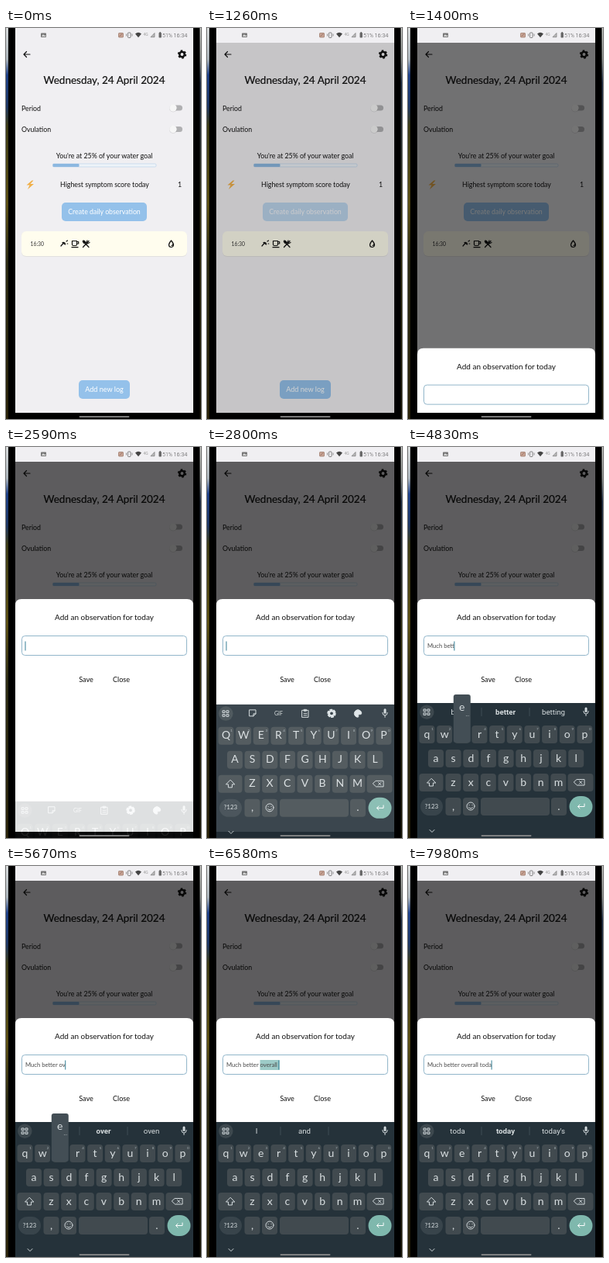
Recreate the animation shown at these times as an HTML page. Size 252 by 504 pixels, loop 8 s.

```html
<!DOCTYPE html>
<html lang="en">
<head>
<meta charset="utf-8">
<title>Daily observation</title>
<style>
html, body { margin: 0; width: 100%; height: 100%; overflow: hidden; background: #000; }
svg { display: block; width: 100%; height: 100%; }
text { font-family: Lato, "Open Sans", sans-serif; font-size: 8.8px; fill: #111; white-space: pre; }
.mid { text-anchor: middle; }
#hints text, .status text { font-family: Roboto, "Noto Sans", sans-serif; }
.kb text { fill: #d8dee0; text-anchor: middle; }
.line { fill: none; stroke: #111; stroke-width: 1.2; stroke-linecap: round; stroke-linejoin: round; }
.kb .line { stroke: #d2d9dc; stroke-width: 1; }
</style>
</head>
<body>
<svg viewBox="0 0 252 504">
  <defs>
    <linearGradient id="wallL" x2="0" y2="1">
      <stop offset="0" stop-color="#d5d8d8"/><stop offset=".08" stop-color="#a9b2b8"/>
      <stop offset=".12" stop-color="#1d3f86"/><stop offset=".2" stop-color="#1c3561"/>
      <stop offset=".25" stop-color="#3b3a14"/><stop offset=".45" stop-color="#5a4e12"/>
      <stop offset=".6" stop-color="#2b2a12"/><stop offset="1" stop-color="#2a230a"/>
    </linearGradient>
    <linearGradient id="wallR" x2="0" y2="1">
      <stop offset="0" stop-color="#c9cbc6"/><stop offset=".08" stop-color="#8e928e"/>
      <stop offset=".14" stop-color="#23324a"/><stop offset=".5" stop-color="#38340f"/>
      <stop offset="1" stop-color="#1c190a"/>
    </linearGradient>
    <clipPath id="screen"><rect x="12" width="230" height="504"/></clipPath>
    <g id="gear">
      <circle r="3.2" fill="none" stroke="currentColor" stroke-width="2.5"/>
      <circle r="4.8" fill="none" stroke="currentColor" stroke-width="1.8" stroke-dasharray="2.5 2.527"/>
    </g>
    <g id="toggle">
      <rect x="212" y="-3.5" width="16" height="7" rx="3.5" fill="#b0b0b2"/>
      <circle cx="216" cy=".5" r="5" fill="#000" opacity=".1"/>
      <circle cx="216" r="4.7" fill="#f6f6f6"/>
    </g>
  </defs>
  <rect width="3" height="504" fill="url(#wallL)"/>
  <rect x="250.500" width="1.500" height="504" fill="url(#wallR)"/>

  <g clip-path="url(#screen)">
    <rect x="12" width="230" height="504" fill="#f0eff2"/>
    <path class="line" d="M31 34H23M26.5 30.500L23 34l3.500 3.500"/>
    <use href="#gear" x="227.500" y="34" color="#111"/>
    <text class="mid" x="127" y="71.500" style="font-size:13.500px;stroke:#111;stroke-width:.2">Wednesday, 24 April 2024</text>
    <text x="20" y="106.500">Period</text>
    <text x="20" y="134">Ovulation</text>
    <use href="#toggle" y="103"/>
    <use href="#toggle" y="130.500"/>
    <text class="mid" x="127" y="168">You're at 25% of your water goal</text>
    <rect x="60.500" y="175" width="133.500" height="4" rx="1.500" fill="#eef3f8" stroke="#b4cfe9" stroke-width=".6"/>
    <rect x="60.500" y="175" width="34" height="4" rx="1" fill="#8cb8e0"/>
    <path d="M33.500 196.500l-7 6h4l-2.500 5.500 8-7h-4.500l4-4.500z" fill="#f0b04a"/>
    <text class="mid" x="127.500" y="205">Highest symptom score today</text>
    <text class="mid" x="224.500" y="205">1</text>
    <g id="create">
      <rect x="72" y="225" width="110" height="24" rx="5" fill="#94c1ea"/>
      <text class="mid" x="127" y="240.300" style="fill:#fff">Create daily observation</text>
    </g>
    <rect x="20" y="262.500" width="214" height="32.500" rx="6" fill="#e2e1df"/>
    <rect x="20" y="262" width="214" height="32" rx="6" fill="#fffdee"/>
    <text x="31.500" y="281.300" style="font-size:6.800px;fill:#333">16:30</text>
    <path class="line" d="M71 281l3-3.500M73 276.500l3.500 2.500q0-3.500-3.500-2.500zM78 275l1.500-1M79 278h.8" stroke-width="1"/>
    <path class="line" d="M85.500 274.500h6v4.500q0 1.500-1.500 1.500h-3q-1.500 0-1.500-1.500zM91.500 275.500h2.200v2.500h-2.200M85 282.700h8"/>
    <path class="line" d="M99.500 274.500l7.500 8M107 274.500l-7.500 8M105 274l-1.500 3M108 276.500l-3 1.500" stroke-width="1.500"/>
    <ellipse cx="101" cy="275.800" rx="1.800" ry="2.600" fill="#111" transform="rotate(-42 101 275.800)"/>
    <path class="line" d="M213.500 274q-3 3.500-3 5.500a3 3 0 0 0 6 0q0-2-3-5.500zM214 280.500q1.200 0 1.300-1.300"/>
    <rect x="94" y="454" width="66" height="24" rx="5" fill="#94c1ea"/>
    <text class="mid" x="127" y="469.300" style="font-size:9.100px;fill:#fff">Add new log</text>

    <rect id="dim" x="12" y="19" width="230" height="485"/>
    <g class="status">
      <rect x="12" width="230" height="19" fill="#f0eff2"/>
      <rect x="45" y="6.500" width="7" height="5.500" rx=".8" fill="#777"/><path d="M46 11l2-3 1.500 2 1-1 1 2z" fill="#ddd"/>
      <rect x="145.500" y="6.500" width="6" height="5.500" rx=".8" fill="#c9a596" stroke="#96705f" stroke-width=".7"/><path d="M147 10.500l3-3" stroke="#7d5547" stroke-width=".8"/>
      <rect x="157.500" y="6" width="3.500" height="6.500" rx=".8" fill="none" stroke="#666" stroke-width=".8"/><path d="M155.500 7.500v3M163 7.500v3" stroke="#666" stroke-width=".7"/>
      <path d="M167 7.500q4-3.500 8 0l-4 4.800z" fill="#444"/>
      <text x="177.500" y="10" style="font-size:5px;fill:#999">4G</text>
      <path d="M187 11.700h5V6.500z" fill="#bbb" stroke="#777" stroke-width=".7"/>
      <rect x="197.500" y="6" width="3.400" height="6.500" rx=".8" fill="#666"/><rect x="198.500" y="5" width="1.400" height="1.500" fill="#666"/>
      <text x="202" y="11.500" style="font-size:7px;font-weight:300;fill:#555">51%</text>
      <text x="216.500" y="11.500" style="font-size:7.300px;font-weight:300;fill:#444">16:34</text>
    </g>

    <g id="sheet">
      <path d="M12 330V8q0-8 8-8H234q8 0 8 8V330z" fill="#fff"/>
      <text class="mid" x="127" y="27.300" style="font-size:10px">Add an observation for today</text>
      <rect x="20.500" y="47.500" width="213" height="25" rx="4" fill="#fff" stroke="#86aec4" stroke-width=".9"/>
      <rect id="mark" y="54" height="13" fill="#9dcbc7"/>
      <text id="entry" x="25" y="63" style="font-size:7.700px;fill:#4a4a4a"></text>
      <rect id="caret" y="54.500" width="1" height="12" fill="#347f96"/>
      <text class="mid" x="103.500" y="107.300" style="font-size:9.100px">Save</text>
      <text class="mid" x="149" y="107.300" style="font-size:9.100px">Close</text>
    </g>

    <rect x="12" y="496" width="230" height="8" fill="#000"/>
    <g id="kb" class="kb">
      <rect x="12" y="330" width="230" height="174" fill="#25323a"/>
      <g class="line">
        <circle cx="24.300" cy="341.700" r="9.300" fill="#3d484e" stroke="none"/>
        <path d="M20.500 338h2.600v2.600h-2.600zM25.400 338h2.600v2.600h-2.600zM20.500 342.800h2.600v2.600h-2.600zM25.400 342.800h2.600v2.600h-2.600z"/>
        <path d="M230 337v3.500" stroke-width="3"/><path d="M226.800 340.500a3.200 3.600 0 0 0 6.400 0M230 344.500v2"/>
      </g>
      <g id="tools" class="line">
        <path d="M55 337h8v5l-3 3h-5zM60 345v-3h3"/>
        <text x="92.500" y="344" style="font-size:7px;stroke:none">GIF</text>
        <path d="M123 337.500h8v9h-8zM125.500 336.500h3v2h-3zM125 341.500h4M125 344h4"/>
        <use href="#gear" x="161" y="341.500" color="#dde4e7"/>
        <path d="M195 337a4.700 4.700 0 1 0 0 9.400q1.500-.4 .7-2t1.300-1.600h1.500q1.500-.3 1.200-1.800a4.700 4 0 0 0-4.700-4z" fill="#dde4e7"/>
      </g>
      <g id="hints"><path d="M95 336v11M157 336v11" stroke="#46545c" stroke-width=".8"/></g>
      <g id="keys"></g>
      <g class="line">
        <path d="M30 427.500l-5.500 5.500h3v4h5v-4h3zM218.500 428.500h9.500v7.500h-9.500l-4-3.750zM221.500 430.500l3.500 3.500M225 430.500l-3.500 3.500"/>
        <circle cx="81" cy="463" r="5"/><path d="M79 461.500h.2M83 461.500h.2M78.500 464.500q2.500 3 5 0"/>
        <path d="M228 460v3.500h-8.500M222 461l-2.500 2.500 2.500 2.500" stroke="#fff"/>
        <path d="M28 493.500l3 3 3-3"/>
      </g>
      <g id="popup">
        <rect x="-11" y="-40" width="22" height="62" rx="3" fill="#434e55"/>
        <text y="-19" style="font-size:14px"></text>
        <text x="7" y="-12" style="font-size:6px">…</text>
      </g>
    </g>
    <rect x="94.500" y="500.300" width="65" height="1.600" rx=".8" fill="#8c8c8c"/>
  </g>
</svg>
<script>
const LOOP = 8000, FOCUS = 2550, MARK = [6510, 6830];
// Commit time, character, word suggestions afterwards
const TYPING = [
  [3360, 'M', 'M,My,Me'], [3570, 'u', 'Mu,My,Much'], [3780, 'c', 'Muc,Much,Music'], [3930, 'h', 'Much,Much,Muchas'],
  [4100, ' ', 'better,more,love'], [4280, 'b', 'b,better,be'], [4440, 'e', 'be,better,been'], [4600, 't', 'bet,better,between'],
  [4730, 't', 'bett,better,betting'], [4900, 'e', 'bette,better,Bette'], [5050, 'r', 'better,better,betters'],
  [5200, ' ', 'than,now,and'], [5400, 'o', 'o,on,of'], [5550, 'v', 'ov,over,oven'], [5690, 'e', 'ove,over,overall'],
  [5830, 'r', 'over,over,overall'], [5980, 'a', 'overa,overall,over'], [6120, 'l', 'overal,overall,overalls'],
  [6270, 'l', 'overall,overall,overalls'], [6510, ' ', 'I,and,'], [6880, 't', 't,the,today'],
  [7210, 'o', 'to,to,today'], [7530, 'd', 'tod,today,Todd'], [7850, 'a', "toda,today,today's"]
];
const PREVIEW = { before: 75, after: 40 };
const KEY = '#414a4f', KEY_DOWN = '#566067';
const $ = id => document.getElementById(id);
const clamp = v => Math.max(0, Math.min(1, v));
const easeOut = p => 1 - (1 - p) ** 2;

function add(parent, tag, attrs, text = '') {
  const node = document.createElementNS('http://www.w3.org/2000/svg', tag);
  for (const name in attrs) node.setAttribute(name, attrs[name]);
  node.textContent = text;
  return parent.appendChild(node);
}

const keyPos = {}, letters = [];
function addKey(x, y, width, label, { size = 14, fill = KEY, radius = 4, height = 23 } = {}) {
  const rect = add($('keys'), 'rect', { x: x - width / 2, y, width, height, rx: radius, fill });
  const text = add($('keys'), 'text', { x, y: y + 11 + size * .33, style: `font-size:${size}px` }, label);
  return { rect, text };
}
['qwertyuiop', 'asdfghjkl', 'zxcvbnm'].forEach((row, r) => {
  [...row].forEach((letter, i) => {
    const x = [24.5, 36, 58.5][r] + i * 22.65, y = 359 + r * 31;
    keyPos[letter] = [x, y];
    letters.push([letter, addKey(x, y, 20, letter).text]);
    if (r === 0) add($('keys'), 'text', { x: x + 7, y: y + 6, style: 'font-size:4.5px;fill:#a9b4b9' }, (i + 1) % 10);
  });
});
addKey(30, 421, 31, '');
addKey(223, 421, 33, '');
addKey(30.5, 452, 29, '?123', { size: 8, fill: '#38444b', radius: 11.5 });
addKey(58.5, 452, 20, ',');
addKey(81, 452, 20, '');
const spaceBar = addKey(138.5, 452, 89, '').rect;
addKey(195, 452, 20, '.');
addKey(223.5, 450, 30, '', { fill: '#7fb8ad', radius: 13.5, height: 27 });

const hints = [64, 126, 188].map(x =>
  add($('hints'), 'text', { x, y: 344.7, 'font-weight': 400, style: 'font-size:9.7px' }));
const [popupLetter] = $('popup').querySelectorAll('text');

const show = (node, on) => node.setAttribute('visibility', on ? 'visible' : 'hidden');
const setText = (node, value) => { if (node.textContent !== value) node.textContent = value; };

function drawSheet(t, typed) {
  const top = t >= FOCUS ? 196 : 504 - 142 * easeOut(clamp((t - 1260) / 350));
  $('sheet').setAttribute('transform', `translate(0 ${top})`);
  $('dim').setAttribute('opacity', .61 * clamp((t - 1190) / 245));
  $('create').setAttribute('opacity', t < 1120 || t > 1400 ? 1 : .55 + .45 * clamp((t - 1260) / 140));

  const entry = $('entry'), text = typed.map(step => step[1]).join('');
  setText(entry, text);
  const widthOf = count => count ? entry.getSubStringLength(0, count) : 0;
  const last = typed.length ? typed[typed.length - 1][0] : FOCUS;
  $('caret').setAttribute('x', 24.5 + widthOf(text.length));
  show($('caret'), t >= FOCUS && (t - last) % 1000 < 500);

  const marked = t >= MARK[0] && t < MARK[1];
  show($('mark'), marked);
  if (marked) {
    const start = widthOf('Much better '.length);
    $('mark').setAttribute('x', 25 + start);
    $('mark').setAttribute('width', widthOf(text.length) - start + 1);
  }
}

function drawKeyboard(t, typed) {
  const rise = clamp((t - FOCUS) / 280);
  $('kb').setAttribute('transform', `translate(0 ${174 * (1 - easeOut(rise))})`);
  $('kb').setAttribute('opacity', rise);

  const started = typed.length > 0;
  letters.forEach(([letter, node]) => setText(node, started ? letter : letter.toUpperCase()));
  show($('tools'), !started);
  show($('hints'), started);
  if (started) {
    const [, char, words] = typed[typed.length - 1];
    words.split(',').forEach((word, i) => setText(hints[i], word));
    hints[1].setAttribute('font-weight', char === ' ' ? 400 : 700);
  }

  const pressed = TYPING.find(([at]) => t >= at - PREVIEW.before && t < at + PREVIEW.after);
  const letter = pressed ? pressed[1] : '';
  spaceBar.setAttribute('fill', letter === ' ' ? KEY_DOWN : KEY);
  const pos = keyPos[letter.toLowerCase()];
  show($('popup'), Boolean(pos));
  if (pos) {
    $('popup').setAttribute('transform', `translate(${pos})`);
    setText(popupLetter, letter);
  }
}

const startTime = performance.now();
function frame() {
  const t = (performance.now() - startTime) % LOOP;
  const typed = TYPING.filter(([at]) => t >= at);
  drawSheet(t, typed);
  drawKeyboard(t, typed);
  requestAnimationFrame(frame);
}
frame();
</script>
</body>
</html>
```
